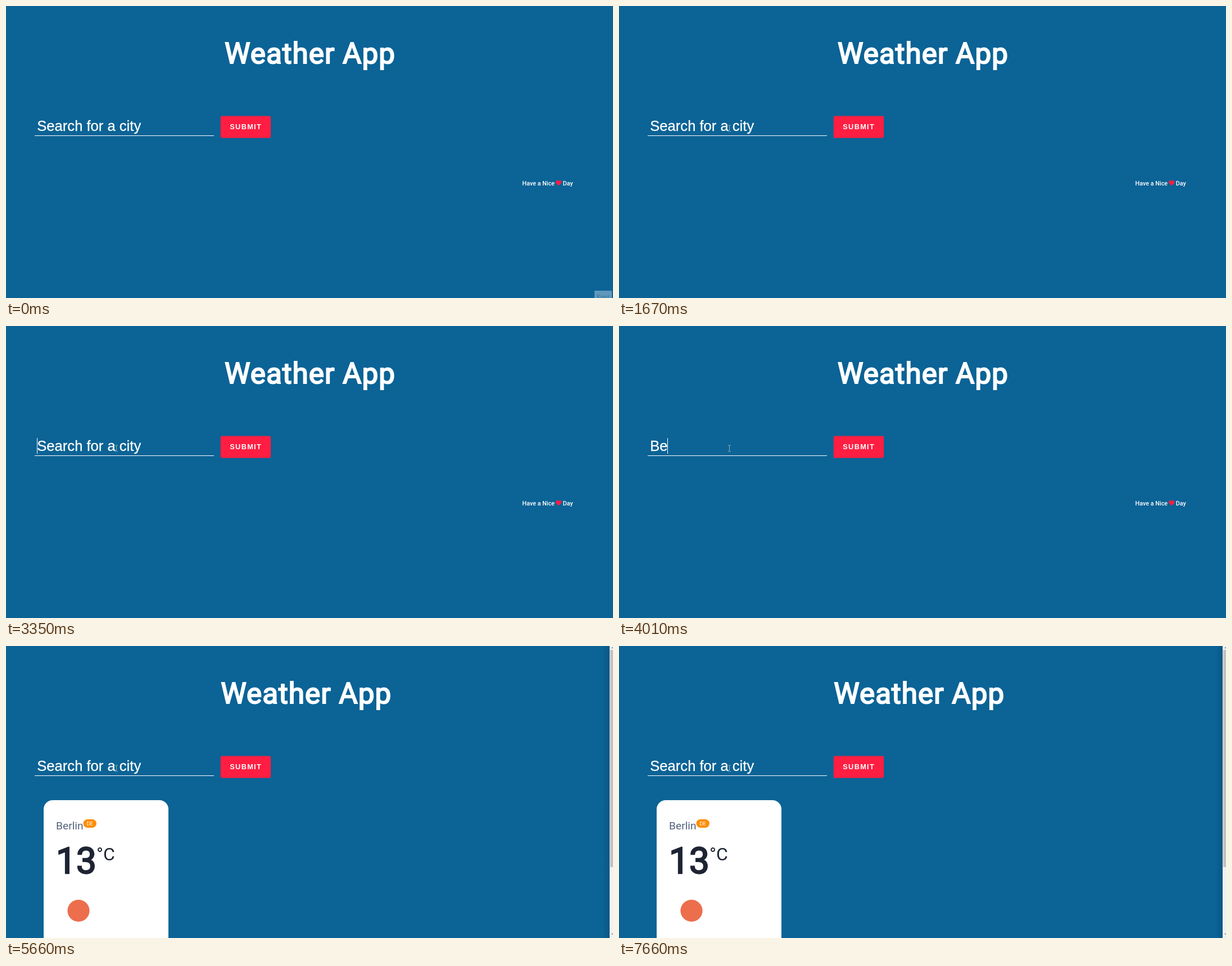
An HTML page for the animation above (8000 ms loop, 1080 px wide and 519 px high).

```html
<!DOCTYPE html>
<html lang="en">
<head>
<meta charset="utf-8">
<title>Weather App</title>
<style>
  html, body { margin: 0; width: 100%; height: 100%; overflow: hidden; background: #0b6396; }
  svg { display: block; width: 1080px; height: 519px; }
  text { fill: #fff; white-space: pre; }
  .roboto { font-family: Roboto, sans-serif; }
  .arial { font-family: "Liberation Sans", Arial, sans-serif; }
  .title { font-size: 51.2px; letter-spacing: .02em; text-anchor: middle; stroke: #fff; stroke-width: 2.1px; }
  .field { font-size: 25.6px; stroke: #fff; stroke-width: .3px; }
  .button { font-size: 12.8px; font-weight: bold; letter-spacing: .1em; }
  .note { font-size: 10.8px; font-weight: 500; }
  .city { font-size: 19.2px; fill: #53627c; }
  .code { font-size: 9.6px; }
  .temp { font-size: 64px; fill: #1e2432; stroke: #1e2432; stroke-width: 2.3px; }
  .unit { font-size: 32px; fill: #1e2432; }
  .tip { font: 9px "Noto Serif", serif; fill: #2c729f; }
</style>
</head>
<body>
<svg viewBox="0 0 1080 519">
  <defs>
    <linearGradient id="shade">
      <stop offset="0" stop-color="#03304f" stop-opacity="0"/>
      <stop offset="1" stop-color="#03304f" stop-opacity=".25"/>
    </linearGradient>
  </defs>
  <rect width="1080" height="519" fill="#0b6396"/>
  <text id="title" class="roboto title" x="541" y="101.5">Weather App</text>

  <rect x="51" y="230" width="319" height="1" fill="#fff"/>
  <text id="field" class="arial field" x="55.3" y="222"></text>
  <rect id="caret" y="199" width="1" height="28" fill="#fff"/>
  <rect x="381.7" y="195.6" width="89.5" height="38.9" rx="3" fill="#ff1e42"/>
  <text class="arial button" x="398.3" y="219">SUBMIT</text>

  <g id="note">
    <text class="roboto note" x="918.5" y="318.5">Have a Nice</text>
    <path d="M983.3 319.2C980 316.4 978.2 314.8 978.2 312.7C978.2 309.6 982 309.2 983.3 311.4C984.6 309.2 988.4 309.6 988.4 312.7C988.4 314.8 986.6 316.4 983.3 319.2Z" fill="#ff1e42"/>
    <text class="roboto note" x="990.7" y="318.5">Day</text>
  </g>

  <g id="tip">
    <rect x="1047" y="506" width="31" height="13" fill="#5f98bc"/>
    <text class="tip" x="1051" y="520">Kayıt</text>
  </g>

  <g id="result">
    <rect x="67" y="274" width="222" height="270" rx="16" fill="#fff"/>
    <text class="roboto city" x="89" y="325.5">Berlin</text>
    <rect x="137.5" y="308" width="23.4" height="15" rx="7.5" fill="#ff8c00"/>
    <text class="roboto code" x="143.2" y="319">DE</text>
    <text class="roboto temp" x="89" y="403.5">13</text>
    <text class="roboto unit" x="161" y="381">°C</text>
    <circle cx="129" cy="470.5" r="19.6" fill="#ec6e4c"/>
    <rect x="1062" width="12" height="519" fill="url(#shade)"/>
    <rect x="1074" width="6" height="519" fill="#f1f1f1"/>
    <rect x="1075" y="7" width="5" height="386" fill="#c1c1c1"/>
    <path d="M1077 4l2-2 1 1v1zM1077 511h3v1l-1 1z" fill="#777"/>
  </g>

  <circle id="click" cx="195" cy="216.5" r="9.8" fill="#ff0" fill-opacity=".47"/>
  <path id="arrow" d="M197.5 256.5v12.5l2.9-2.7 2 4.4 2-.9-1.9-4.2h4z" fill="#fff" stroke="#111" stroke-width=".8"/>
  <path id="beam" d="M-2.5-5.5h2M.5-5.5h2M0-5V5M-2.5 5.5h2M.5 5.5h2" fill="none" stroke="#a9adae"/>
</svg>
<script>
  const LOOP = 8000;
  const HINT = "Search for a city";
  const el = id => document.getElementById(id);
  const show = (id, on) => el(id).setAttribute("visibility", on ? "visible" : "hidden");

  // [start, typed text, caret x]
  const typing = [
    [0, "", 55], [3670, "B", 72], [4010, "Be", 86], [4350, "Ber", 95],
    [4660, "Berli", 106], [5010, "Berlin", 120], [5660, "", 55]
  ];
  const blinks = [[1000, 1670], [2340, 2670], [3350, 5660], [6350, 6660], [7330, 7660]];

  const within = (t, [from, to]) => t >= from && t < to;

  function draw(t) {
    const [, typed, caretX] = typing.filter(s => s[0] <= t).pop();
    const done = t >= 5660;
    el("field").textContent = typed || HINT;
    el("caret").setAttribute("x", caretX);
    show("caret", blinks.some(b => within(t, b)));
    el("title").setAttribute("x", done ? 534.3 : 541);
    show("result", done);
    show("note", !done);
    show("tip", t < 330);
    show("arrow", within(t, [330, 670]));
    show("click", within(t, [1000, 1330]));
    show("beam", t >= 670);
    el("beam").setAttribute("transform", `translate(196.5 ${t < 1000 ? 228.5 : 217.5})`);
  }

  const start = performance.now();
  function tick() {
    draw((performance.now() - start) % LOOP);
    requestAnimationFrame(tick);
  }
  tick();
</script>
</body>
</html>
```
